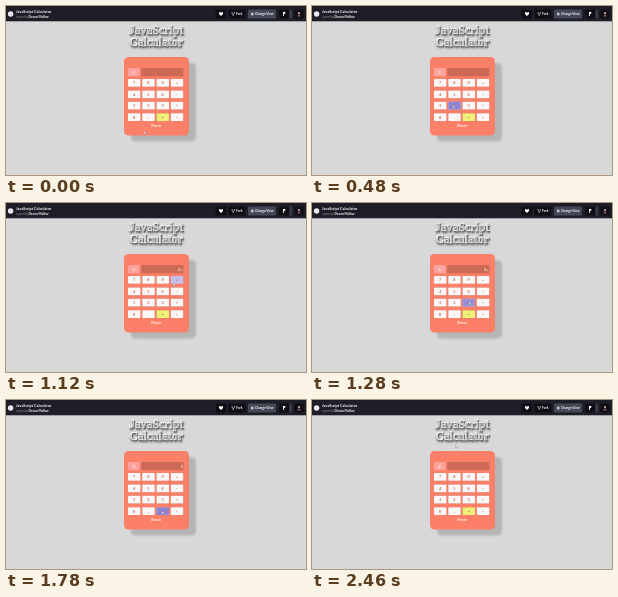
An HTML page for the animation above (2480 ms loop, 300 by 169 pixels).

```html
<!DOCTYPE html>
<html lang="en">
<head>
<meta charset="utf-8">
<title>JavaScript Calculator</title>
<style>
  html, body { margin: 0; height: 100%; overflow: hidden; background: #d8d8d8; }
  svg { display: block; width: 100vw; height: 100vh; }
  .ui { font: bold 3.8px Lato, sans-serif; fill: #fff; }
  .small { font-size: 3.2px; }
  .title { font: bold 11.8px "Liberation Serif", serif; fill: #fff; text-anchor: middle;
           stroke: #fff; stroke-width: .35px;
           text-shadow: .8px 1.2px 1px #555, 1px 1.8px 2px #777; }
  .label { font: bold 4.4px "Liberation Serif", serif; text-anchor: middle; }
  .key { filter: drop-shadow(.5px .8px .4px #a0503f); }
</style>
</head>
<body>
<svg viewBox="0 0 300 169" preserveAspectRatio="none">
  <defs><filter id="soft"><feGaussianBlur stdDeviation="1"/></filter></defs>
  <rect width="300" height="169" fill="#d8d8d8"/>

  <rect width="300" height="15.3" fill="#1e1e28"/>
  <circle cx="4.6" cy="8" r="2.7" fill="#e8e8ec"/>
  <g class="ui">
    <text x="10" y="7.2">JavaScript Calculator</text>
    <text x="10" y="11.8" class="small"><tspan fill="#777">a pen by</tspan> Devan Malhur</text>
    <g fill="#0e0f15">
      <rect x="209.500" y="3.500" width="10.500" height="9" rx="1"/>
      <rect x="222.500" y="3.500" width="17" height="9" rx="1"/>
      <rect x="242" y="3.500" width="28" height="9" rx="1" fill="#444857"/>
      <rect x="273" y="3.500" width="10" height="9" rx="1"/>
      <rect x="283.500" y="3.500" width="2.500" height="9" rx=".5" fill="#3a3c49"/>
      <rect x="288.500" y="3.500" width="9" height="9" rx="1"/>
    </g>
    <path d="M215 10l-2-2.1q-.5-1.5.8-1.8.8 0 1.2.8.4-.8 1.2-.8 1.3.3.8 1.8z"/>
    <path d="M226 6v1.500l1.200 1V10M228.400 6v1.500l-1.200 1" fill="none" stroke="#fff" stroke-width=".6"/>
    <text x="230" y="9.200" class="small">Fork</text>
    <path d="M245 6.700h2.500v2.600h-2.500z" fill="#c5c7d0"/>
    <text x="249" y="9.200" class="small">Change View</text>
    <path d="M277 6h2.300v1.800h-1.200l-.4 2.200h-.7z"/>
    <circle cx="293" cy="7.200" r="1.100" fill="#c9a6a0"/>
    <path d="M291 10.500q2-4 4 0z" fill="#8a5050"/>
  </g>

  <text class="title" x="150" y="27.800">JavaScript</text>
  <text class="title" x="150" y="39.800">Calculator</text>

  <rect x="125" y="57" width="65" height="78.500" rx="4.500" fill="#b5b5b5" filter="url(#soft)"/>
  <rect x="118" y="51" width="65" height="78.500" rx="4.500" fill="#fc8068"/>
  <rect x="122" y="62" width="11.700" height="8.300" rx=".8" fill="#fda29c"/>
  <text class="label" x="128" y="67.700" fill="#fff">C</text>
  <rect x="135.200" y="62" width="42.300" height="8.300" rx=".8" fill="#cc6a56"/>
  <text id="display" class="label" x="177.200" y="68" fill="#fff" style="text-anchor:end;letter-spacing:.3px"></text>
  <g id="keys"></g>
  <text class="label" x="150.200" y="121.300" fill="#fff" style="font-size:3.700px">Power</text>

  <path id="cursor" d="M0 0V3.200L.8 2.500 1.300 3.600 1.700 3.400 1.300 2.300H2.200z" fill="#f4f4f4" stroke="#777" stroke-width=".3"/>
</svg>
<script>
const LOOP = 2480, FADE = 100;
const $ = id => document.getElementById(id);

// Cursor stops: time, x, y
const path = [
  [0, 138, 125], [220, 139, 125], [420, 141, 99], [580, 141, 99],
  [860, 176.5, 78], [960, 171, 76], [1080, 170, 76], [1230, 157, 99],
  [1320, 157, 99], [1460, 158, 119], [1540, 159, 126], [1680, 157, 111],
  [1800, 156, 111], [2020, 129, 66], [2180, 129, 66], [2460, 143.5, 45]
];
const readout = [[0, ""], [560, "2"], [1020, "2+"], [1290, "2+3"], [1740, "5"], [2200, ""]];
const hovers = { "2": [360, 620], "+": [880, 1070], "3": [1190, 1350], "=": [1630, 1840] };

const clamp = v => Math.max(0, Math.min(1, v));
const ease = v => v * v * (3 - 2 * v);

function add(parent, tag, attrs, text = "") {
  const node = document.createElementNS("http://www.w3.org/2000/svg", tag);
  for (const name in attrs) node.setAttribute(name, attrs[name]);
  node.textContent = text;
  return parent.appendChild(node);
}

const glow = {};
[..."789+456−123×0.=÷"].forEach((label, i) => {
  const x = 122 + (i % 4) * 14.25, y = 73 + (i >> 2) * 11.4;
  const box = { x, y, width: 12.5, height: 7.8, rx: .7 };
  add($("keys"), "rect", { ...box, class: "key", fill: label === "=" ? "#eef07a" : "#fdf8f8" });
  if (hovers[label]) glow[label] = add($("keys"), "rect", { ...box, fill: "#8d84d8" });
  add($("keys"), "text", { class: "label", x: x + 6.2, y: y + 5.4, fill: "#c0645c" }, label);
});

function cursorAt(t) {
  const next = path.findIndex(p => p[0] > t);
  if (next < 0) return path.at(-1).slice(1);
  const [t0, x0, y0] = path[next - 1], [t1, x1, y1] = path[next];
  const k = ease((t - t0) / (t1 - t0));
  return [x0 + (x1 - x0) * k, y0 + (y1 - y0) * k];
}

function draw() {
  const t = performance.now() % LOOP;
  $("cursor").setAttribute("transform", `translate(${cursorAt(t)})`);
  $("display").textContent = readout.findLast(r => r[0] <= t)[1];
  for (const label in glow) {
    const [start, end] = hovers[label];
    glow[label].setAttribute("opacity", Math.min(clamp((t - start) / FADE), clamp(1 - (t - end) / FADE)));
  }
  requestAnimationFrame(draw);
}
draw();
</script>
</body>
</html>
```
